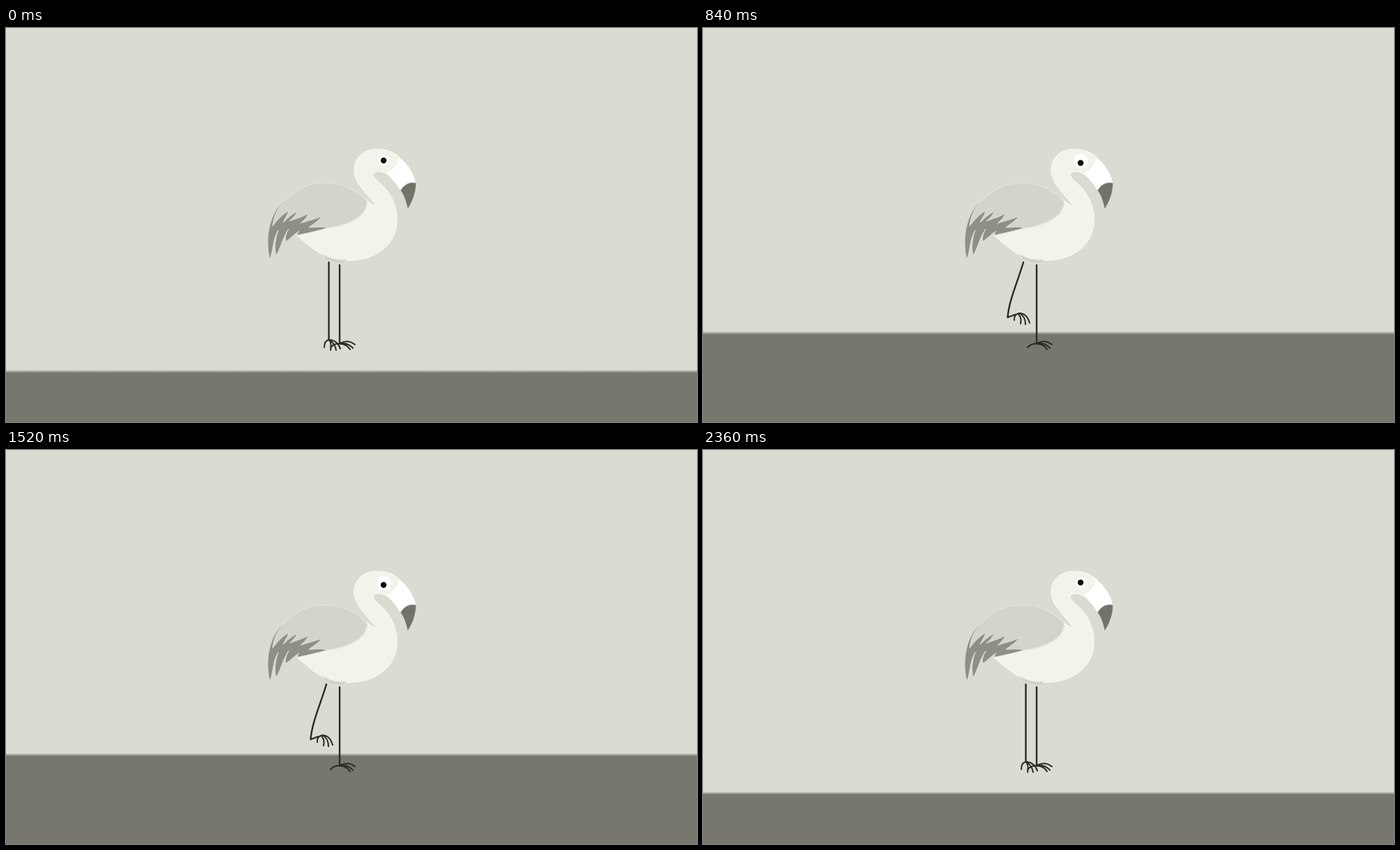
Animation, 990 px wide and 565 px high, one loop 2.4 s. Source, as an HTML page:

```html
<!DOCTYPE html>
<html lang="en">
<head>
<meta charset="utf-8">
<title>Wading bird</title>
<style>
  html, body { margin: 0; width: 100%; height: 100%; overflow: hidden; background: #dbdbd2; }
  svg { display: block; width: 990px; height: 565px; }
  .loop { animation: 2400ms linear infinite; }
  .tide { animation-name: tide; }
  .stand, .half, .tucked, .alarm { animation-timing-function: step-end; }
  .stand { animation-name: stand; }
  .half { animation-name: half; }
  .tucked { animation-name: tucked; }
  .alarm { animation-name: alarm; }
  .leg { fill: none; stroke: #2b2b22; stroke-width: 2.4; stroke-linecap: round; stroke-linejoin: round; }
  .toes { stroke-width: 2; }

  @keyframes tide {
    0% { transform: translateY(492.5px); }
    49.33% { transform: translateY(414.8px); }
    98.67%, 100% { transform: translateY(492.5px); }
  }
  /* poses switch hard at 500, 1000, 1360 and 1860 ms */
  @keyframes stand {
    0% { visibility: visible; }
    20.83% { visibility: hidden; }
    77.5%, 100% { visibility: visible; }
  }
  @keyframes half {
    0% { visibility: hidden; }
    20.83% { visibility: visible; }
    41.67% { visibility: hidden; }
    56.67% { visibility: visible; }
    77.5%, 100% { visibility: hidden; }
  }
  @keyframes tucked {
    0% { visibility: hidden; }
    41.67% { visibility: visible; }
    56.67%, 100% { visibility: hidden; }
  }
  @keyframes alarm {
    0% { visibility: hidden; }
    20.83% { visibility: visible; }
    29.17%, 100% { visibility: hidden; }
  }
</style>
</head>
<body>
<svg viewBox="0 0 990 565">
  <defs>
    <linearGradient id="edge" x1="0" y1="0" x2="0" y2="1">
      <stop offset="0" stop-color="#77776e" stop-opacity="0"/>
      <stop offset="1" stop-color="#77776e"/>
    </linearGradient>
  </defs>
  <rect width="990" height="565" fill="#dbdbd2"/>

  <g class="loop tide">
    <rect y="-2" width="990" height="4" fill="url(#edge)"/>
    <rect y="2" width="990" height="200" fill="#77776e"/>
  </g>

  <!-- standing leg -->
  <g class="leg">
    <path d="M478 340V452"/>
    <path class="toes" d="M465 458Q471 452 479 453Q488 453 493 461M479 452Q490 451 497 459M479 452Q490 446 500 454"/>
  </g>

  <!-- body, neck and head -->
  <path fill="#f3f3eb" stroke="#f8f8f2" stroke-width="1.4" stroke-linejoin="round"
    d="M564 186C555 177 543 174 531 174C512 174 499 187 499 203C499 224 519 238 531 255
       C526 255 521 251 517 247L470 260L417 297C436 313 453 333 490 333
       C533 333 560 308 560 275C560 250 548 234 536 223C528 216 525 213 526 209
       C529 204 538 205 545 209Z"/>

  <!-- wing -->
  <path fill="#d4d4cd" stroke="#e5e5de" stroke-width="1.2" stroke-linejoin="round"
    d="M382 284C386 262 390 253 400 247C416 230 436 222 458 222C484 222 506 236 517 248
       C519 269 492 283 460 287L418 297L400 290Z"/>
  <path fill="#8f8f88" stroke="#e8e8e1" stroke-width=".8" stroke-linejoin="round"
    d="M400 247C378 262 370 302 378 332C383 320 382 303 390 290C386 300 384 315 387 326
       C393 318 395 303 405 288C402 294 399 300 401 306C408 302 412 296 420 291
       C418 293 417 295 418 297C432 294 446 291 460 287C450 284 445 286 434 286
       C440 281 449 276 452 270C444 274 430 277 422 280C428 275 432 270 433 266
       C425 271 413 274 406 277C412 272 416 267 417 263C408 268 402 274 397 279
       C400 272 404 267 405 262C395 268 388 276 382 284C384 270 388 258 400 247Z"/>

  <path fill="#d1d1ca" stroke="#e8e8e1" stroke-width=".8"
    d="M454 324C464 331 475 333 488 332L485 337C478 339 470 337 464 334L458 333Z"/>

  <!-- beak -->
  <path fill="#fff" d="M564 186C576 195 584 208 587 222Q573 220 565 233Q557 219 545 209Q557 200 564 186Z"/>
  <path fill="#73736a" stroke="#e8e8e1" stroke-width=".7" d="M587.500 222C588 236 582 250 575.500 260C573 249 570 239 565 233Q573 219 587.500 222Z"/>

  <g class="loop stand">
    <g class="leg">
      <path d="M462.500 336V447"/>
      <path class="toes" d="M456 458Q456 448 463 447Q475 448 479 460M463 447Q467 453 465 462M463 447Q471 452 473 462"/>
    </g>
    <circle cx="541" cy="190" r="7.500" fill="#fff"/>
    <circle cx="541" cy="190" r="4.200" fill="#0c0c0a"/>
  </g>

  <g class="loop half">
    <g class="leg">
      <path d="M459 336C450 366 438 392 436.500 415L447 411"/>
      <path class="toes" d="M446 419Q445 411 453 409Q464 409 468 423M452 410Q457 416 455 424M454 409Q462 414 462 425"/>
    </g>
    <circle cx="541" cy="191" r="10.500" fill="#fff"/>
    <circle cx="541" cy="193.500" r="4.200" fill="#0c0c0a"/>
  </g>

  <g class="loop tucked">
    <g class="leg">
      <path d="M457 331C450 345 448 357 445 369C465 358 490 354 508 370"/>
      <path class="toes" d="M499 380Q498 371 507 370Q518 371 521 384M507 370Q511 377 508 385M508 370Q515 376 515 386"/>
    </g>
    <circle cx="541" cy="191" r="10.500" fill="#fff"/>
    <circle cx="541" cy="194" r="6" fill="#0c0c0a"/>
  </g>

  <path class="loop alarm" fill="#5a5a52"
    d="M531 147.500H539L537.500 163.500H532.500ZM508 158L514 153.500L524 166L520 169.500ZM561.500 158L556 153.500L545 166L549 169.500Z"/>
</svg>
</body>
</html>
```
